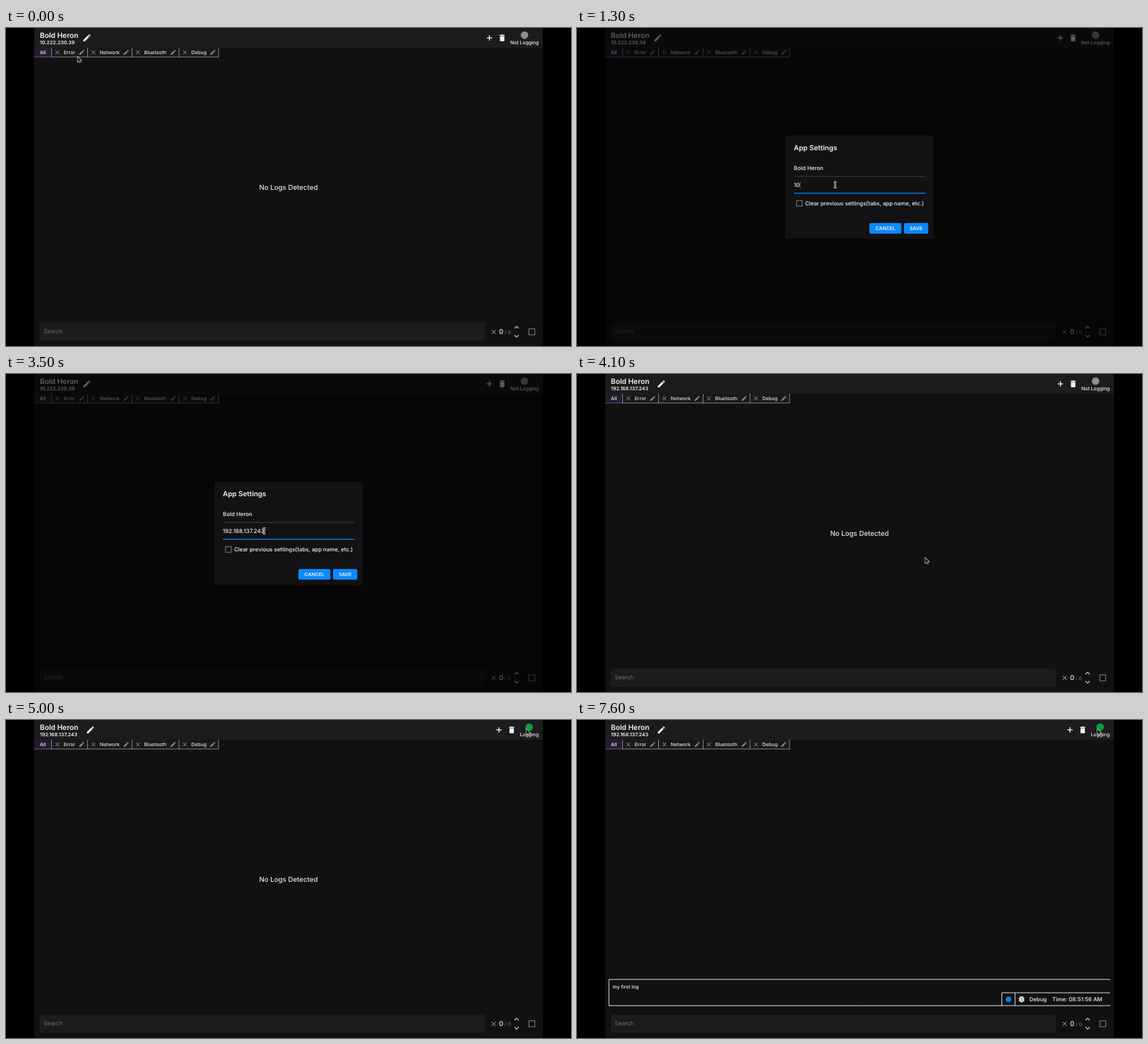
An HTML page with a canvas for the animation above (8 s loop, 800x450 px).

```html
<!DOCTYPE html>
<html lang="en">
<head>
<meta charset="utf-8">
<title>Log viewer</title>
<style>
html, body { margin: 0; width: 100%; height: 100%; overflow: hidden; background: #000; }
canvas { display: block; width: 800px; height: 450px; }
</style>
</head>
<body>
<canvas id="stage" width="800" height="450"></canvas>
<script>
const ctx = document.getElementById('stage').getContext('2d');
const LOOP = 8000;
const APP = 'Bold Heron';
const OLD_IP = '10.222.230.39';
const NEW_IP = '192.168.137.243';
const WHITE = '#f4f4f5', GREY = '#8f8e92', BLUE = '#0a8aff', PANEL = '#1c1b1e';

const OPEN = 280, CLEAR = 900, TYPE = 1450, SAVE = 3880, START_LOG = 4800, FIRST_LOG = 6600;
const CLEAR_STEP = 36;

const PENCIL = new Path2D('M3 17.25V21h3.75L17.81 9.94l-3.75-3.75L3 17.25zM20.71 7.04c.39-.39.39-1.02 0-1.41l-2.34-2.34c-.39-.39-1.02-.39-1.41 0l-1.83 1.83 3.75 3.75 1.83-1.83z');
const TRASH = new Path2D('M6 19c0 1.1.9 2 2 2h8c1.1 0 2-.9 2-2V7H6v12zM19 4h-3.5l-1-1h-5l-1 1H5v2h14V4z');
const BUG = new Path2D('M20 8h-2.81c-.45-.78-1.07-1.45-1.82-1.96L17 4.41 15.59 3l-2.17 2.17C12.96 5.06 12.49 5 12 5c-.49 0-.96.06-1.41.17L8.41 3 7 4.41l1.62 1.63C7.88 6.55 7.26 7.22 6.81 8H4v2h2.09c-.05.33-.09.66-.09 1v1H4v2h2v1c0 .34.04.67.09 1H4v2h2.81c1.04 1.79 2.97 3 5.19 3s4.15-1.21 5.19-3H20v-2h-2.09c.05-.33.09-.66.09-1v-1h2v-2h-2v-1c0-.34-.04-.67-.09-1H20V8zm-6 8h-4v-2h4v2zm0-4h-4v-2h4v2z');
const ARROW = new Path2D('M0 0V7.2L1.7 5.7L2.8 8.2L4 7.7L2.9 5.2H5.1Z');

// Pointer stops: time, x, y
const STOPS = [
  [0, 101.5, 40.5], [220, 114, 14], [320, 114, 14], [700, 365.5, 222],
  [3520, 365.5, 222], [3800, 480, 283], [3980, 480, 283], [4300, 521, 212],
  [4490, 750, 17], [4740, 737, 13], [LOOP, 737, 13]
];

const clamp = v => Math.max(0, Math.min(1, v));
const ease = v => v * v * (3 - 2 * v);

function rect(x, y, w, h, fill, r = 0) {
  ctx.fillStyle = fill;
  ctx.beginPath();
  ctx.roundRect(x, y, w, h, r);
  ctx.fill();
}

function line(color, width, ...pts) {
  ctx.strokeStyle = color;
  ctx.lineWidth = width;
  ctx.beginPath();
  for (let i = 0; i < pts.length; i += 2) ctx.lineTo(pts[i], pts[i + 1]);
  ctx.stroke();
}

function box(x, y, size, color) {
  ctx.strokeStyle = color;
  ctx.lineWidth = 0.9;
  ctx.strokeRect(x, y, size, size);
}

function dot(x, y, r, color) {
  ctx.fillStyle = color;
  ctx.beginPath();
  ctx.arc(x, y, r, 0, Math.PI * 2);
  ctx.fill();
}

function text(str, x, y, size, color = WHITE, weight = 500, align = 'left') {
  ctx.font = `${weight} ${size}px Inter, "Liberation Sans", sans-serif`;
  ctx.textRendering = 'geometricPrecision';
  ctx.fillStyle = color;
  ctx.textAlign = align;
  ctx.fillText(str, x, y);
  return ctx.measureText(str).width;
}

function icon(path, cx, cy, size, color) {
  ctx.save();
  ctx.translate(cx - size / 2, cy - size / 2);
  ctx.scale(size / 24, size / 24);
  ctx.fillStyle = color;
  ctx.fill(path);
  ctx.restore();
}

function cross(x, y, r, color) {
  line(color, 0.9, x - r, y - r, x + r, y + r);
  line(color, 0.9, x - r, y + r, x + r, y - r);
}

function header(t) {
  const saved = t >= SAVE, logging = t >= START_LOG;
  const shift = logging ? 13.5 : 0;
  rect(40, 0, 720, 28, PANEL);
  text(APP, 48, 13.6, 10.2, WHITE, 600);
  text(saved ? NEW_IP : OLD_IP, 48, 23.1, 7, WHITE, 600);
  icon(PENCIL, saved ? 119.5 : 114.5, 14, 13.3, WHITE);

  const px = 684.5 + shift;
  line(WHITE, 1.3, px - 3.8, 14, px + 3.8, 14);
  line(WHITE, 1.3, px, 10.2, px, 17.8);
  icon(TRASH, 702.5 + shift, 14, 12.5, WHITE);
  const cx = logging ? 740.8 : 734.2;
  dot(cx, 10.1, 5.3, logging ? '#0c9f3b' : GREY);
  text(logging ? 'Logging' : 'Not Logging', cx, 23, 6.9, WHITE, 500, 'center');
}

function tabs() {
  rect(40, 28, 24.5, 13, '#251b31');
  line('#71558c', 0.9, 40, 41, 64.5, 41);
  text('All', 48, 37.4, 6.9);
  const edges = [64.5, 115.5, 178.5, 245, 301];
  ['Error', 'Network', 'Bluetooth', 'Debug'].forEach((name, i) => {
    const x = edges[i], end = edges[i + 1];
    rect(x, 28, end - x, 13, '#19181b');
    cross(x + 8.2, 34.5, 2.6, '#a5a4a8');
    text(name, x + 17.2, 37.2, 6.9, '#e6e6e8');
    icon(PENCIL, end - 8.2, 34.5, 9.6, GREY);
  });
  line(GREY, 0.9, 64.5, 41, 301, 41);
  edges.forEach(x => line(GREY, 0.9, x, 28, x, 41.4));
}

function searchBar() {
  rect(48, 417, 630, 25.5, PANEL, 3);
  text('Search', 53.5, 432, 8.1, '#717074', 400);
  cross(690.5, 430, 2.9, '#c9c9cc');
  text('0', 698, 433.4, 9.5);
  text('/ 0', 706, 433, 7, '#77767a', 400);
  line('#c9c9cc', 1.1, 720, 425, 723, 422, 726, 425);
  line('#c9c9cc', 1.1, 720, 434.5, 723, 437.5, 726, 434.5);
  box(740.3, 425.7, 8.4, GREY);
}

function logEntry() {
  line(WHITE, 0.9, 755, 367.1, 45.2, 367.1, 45.2, 404.2, 755, 404.2);
  line(WHITE, 0.9, 755, 386, 601.5, 386, 601.5, 404.2);
  line(WHITE, 0.9, 620.2, 386, 620.2, 404.2);
  text('my first log', 50.5, 379.5, 6.9);
  dot(611, 395.2, 4, '#0a7fdc');
  icon(BUG, 629.5, 395, 12, WHITE);
  text('Debug', 640.5, 397.8, 7.8);
  text('Time: 08:51:56 AM', 673, 397.8, 7.9);
}

// The first group is typed quickly, the rest after a pause
const keyTime = i => i < 3 ? TYPE + i * 75 : 2150 + (i - 3) * 110;

function field(t) {
  if (t < TYPE) {
    const gone = Math.max(0, Math.min(OLD_IP.length, Math.floor((t - CLEAR) / CLEAR_STEP)));
    return { value: OLD_IP.slice(0, OLD_IP.length - gone), lastKey: Math.min(t, CLEAR + gone * CLEAR_STEP) };
  }
  let n = 0;
  while (n < NEW_IP.length && keyTime(n) <= t) n++;
  return { value: NEW_IP.slice(0, n), lastKey: keyTime(n - 1) };
}

function button(label, x, w) {
  rect(x, 276.1, w, 14.9, BLUE, 2);
  text(label, x + w / 2, 286.1, 6.9, WHITE, 600, 'center');
}

function dialog(t) {
  const shown = ease(clamp((t - OPEN) / 225)) * (1 - ease(clamp((t - SAVE) / 195)));
  if (shown <= 0) return;
  ctx.save();
  ctx.globalAlpha = shown;
  rect(40, 0, 720, 450, 'rgba(0,0,0,.62)');
  rect(295, 152, 210, 146, '#121114', 2);
  text('App Settings', 307, 173.3, 9.9, WHITE, 600);
  text(APP, 307, 200.7, 7.9);
  line('#4b4a4e', 0.8, 307, 210, 493.5, 210);
  const { value, lastKey } = field(t);
  const w = text(value, 307, 224.7, 7.9);
  line(BLUE, 1.2, 307, 233.8, 493.5, 233.8);
  if (t > 720 && t < SAVE && (t - lastKey) % 1000 < 500) {
    line('#b04fb8', 0.9, 307.6 + w, 217, 307.6 + w, 227);
  }
  box(310.9, 244.2, 8, '#8a898d');
  text('Clear previous settings(tabs, app name, etc.)', 323, 251, 7.85);
  button('CANCEL', 414, 45.4);
  button('SAVE', 463, 34.4);
  ctx.restore();
}

function pointer(t) {
  const i = STOPS.findIndex(s => s[0] > t);
  const [t0, x0, y0] = STOPS[i - 1], [t1, x1, y1] = STOPS[i];
  const k = ease((t - t0) / (t1 - t0));
  const x = x0 + (x1 - x0) * k, y = y0 + (y1 - y0) * k;
  const overField = t > OPEN && t < SAVE && x > 307 && x < 493 && y > 212 && y < 234;

  ctx.save();
  ctx.translate(x, y);
  if (overField) {
    for (const [color, width] of [['#e4e4e6', 2.2], ['#161518', 0.7]]) {
      line(color, width, 0, -3.8, 0, 3.8);
      line(color, width, -1.8, -4, 1.8, -4);
      line(color, width, -1.8, 4, 1.8, 4);
    }
  } else {
    ctx.strokeStyle = '#e4e4e6';
    ctx.lineWidth = 1.2;
    ctx.stroke(ARROW);
    ctx.fillStyle = '#161518';
    ctx.fill(ARROW);
  }
  ctx.restore();
}

function draw(t) {
  rect(0, 0, 800, 450, '#000');
  rect(40, 0, 720, 450, '#111013');
  header(t);
  tabs();
  if (t < FIRST_LOG) text('No Logs Detected', 400, 229, 9.7, '#e6e6e8', 500, 'center');
  else logEntry();
  searchBar();
  dialog(t);
  pointer(t);
}

const begin = performance.now();
function frame() {
  draw((performance.now() - begin) % LOOP);
  requestAnimationFrame(frame);
}
frame();
</script>
</body>
</html>
```
